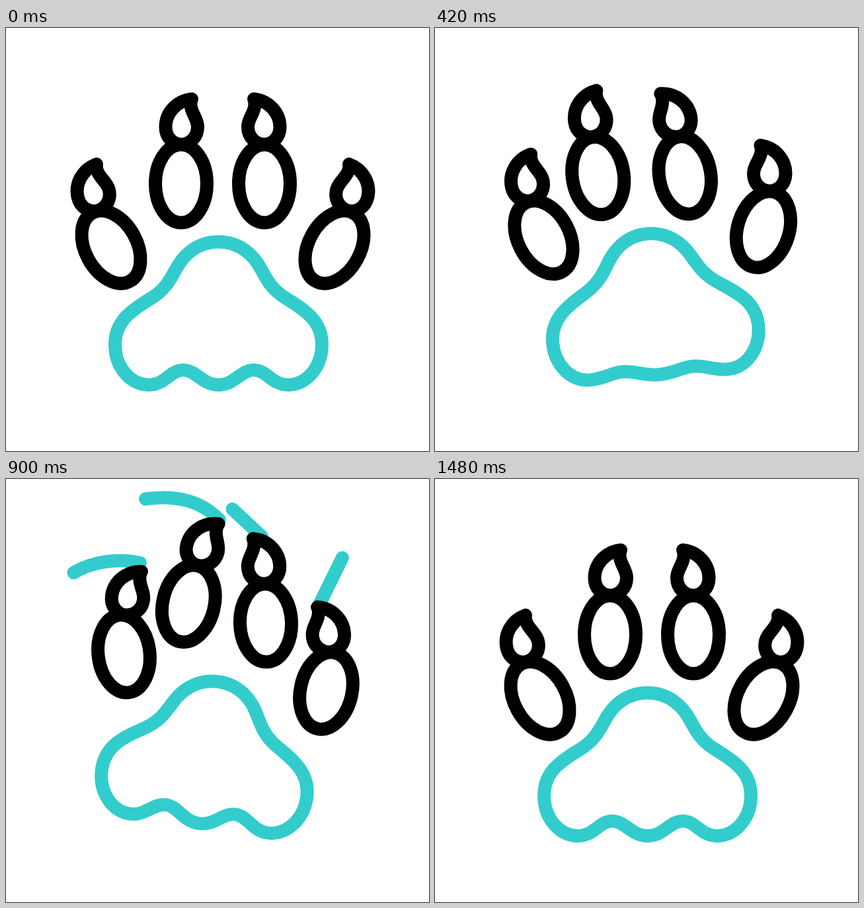
Write an HTML page that moves like this. It is 640 px wide and 640 px high and loops after 1.6 s.

```html
<!DOCTYPE html>
<html lang="en">
<head>
<meta charset="utf-8">
<title>Paw swipe</title>
<style>
html, body { margin: 0; height: 100%; overflow: hidden; background: #fff; }
svg { display: block; width: 100%; height: 100%; }
svg * { fill: none; stroke-width: 20; stroke-linecap: round; stroke-linejoin: round; }
.toe { stroke: #000; }
.teal { stroke: #33cccc; }
</style>
</head>
<body>
<svg id="stage" viewBox="0 0 640 640"></svg>
<script>
const LOOP = 1600;
const TIMES = [0, 160, 280, 420, 580, 600, 900, 1060, 1480];
const stage = document.getElementById('stage');

function add(parent, tag, attrs) {
  const el = document.createElementNS('http://www.w3.org/2000/svg', tag);
  for (const k in attrs) el.setAttribute(k, attrs[k]);
  return parent.appendChild(el);
}

function smooth(t, a, b) {
  const x = Math.min(1, Math.max(0, (t - a) / (b - a)));
  return x * x * (3 - 2 * x);
}

// Six poses: rest, wind-up, rise, reach, swipe, recoil.
// The turning points at 280 and 580 ms follow from their neighbours.
function track([rest, wind, rise, reach, swipe, recoil]) {
  const low = rest + (wind - rest) / 0.606;
  const peak = reach + (reach - swipe) * 0.02;
  return curve([rest, wind, low, rise, peak, reach, swipe, recoil, rest]);
}

// Monotone cubic through the keys, level at every turning point
function curve(v) {
  const n = v.length;
  const h = i => TIMES[i + 1] - TIMES[i];
  const d = i => (v[i + 1] - v[i]) / h(i);
  const m = v.map((_, i) => {
    if (i === 0 || i === n - 1 || d(i - 1) * d(i) <= 0) return 0;
    const w1 = 2 * h(i) + h(i - 1), w2 = h(i) + 2 * h(i - 1);
    return (w1 + w2) / (w1 / d(i - 1) + w2 / d(i));
  });
  return t => {
    if (t >= TIMES[n - 1]) return v[n - 1];
    let i = 0;
    while (t >= TIMES[i + 1]) i++;
    const u = (t - TIMES[i]) / h(i), s = u * u * (3 - 2 * u);
    return v[i] + (v[i + 1] - v[i]) * s
      + h(i) * u * (1 - u) * (m[i] * (1 - u) - m[i + 1] * u);
  };
}

// Pad: position, tilt, stretch of the top arc, height of the lower waves
const pad = {
  x: track([321.5, 308, 333.5, 362.5, 300, 306]),
  y: track([479, 501.5, 464, 405, 460.5, 477.5]),
  r: track([0, 4.7, -4.4, -16.2, 7.9, 5.8]),
  stretch: track([0, -0.18, -0.1, 1, 0, 0]),
  wave: track([22.5, 15.5, 8.6, 8, 21, 21.5])
};

const toes = [
  { side: 1, outer: true,
    x: track([159, 170.5, 164.5, 149.5, 178.5, 171.5]),
    y: track([331.5, 343, 317, 286, 264.5, 298]),
    r: track([0, 17, 1.5, -32, 22, 16.5]) },
  { side: 1,
    x: track([265, 276.5, 247, 199, 276.3, 273.7]),
    y: track([235.5, 267, 224, 166, 188.5, 217]),
    r: track([0, 8.5, -8, -34.5, 13.5, 10.6]) },
  { side: -1,
    x: track([391, 390, 378.3, 360.7, 393, 391.5]),
    y: track([235.5, 278.7, 223.5, 136.5, 217.7, 235.7]),
    r: track([0, -1.3, -9.5, -13.5, -1.5, -1.5]) },
  { side: -1, outer: true,
    x: track([497, 483, 496.8, 516.5, 484.5, 485.7]),
    y: track([331.5, 373, 305.5, 206.5, 320.3, 335]),
    r: track([0, -8.4, -12, -5.5, -16, -12.5]) }
];

const CLAW = 'M16-128C-7-125.5-23.5-107-23.5-85.5C-23.5-71-13-59.5 0-59.5'
  + 'C14-59.5 25-71 25-86C25-99 14.5-107 14.5-120C14.5-124 15-126 16-128Z';

const trails = [
  'M64 192C72 172 84 152 102 142C130 125 170 119 203 127',
  'M140 53Q170 36 212 30C262 24 296 34 323 62',
  'M315 20L387 87',
  'M529 78L476 186'
].map(d => add(stage, 'path', { class: 'teal', d, pathLength: 1 }));

const padPath = add(stage, 'path', { class: 'teal' });

for (const toe of toes) {
  toe.el = add(stage, 'g', { class: 'toe' });
  add(toe.el, 'ellipse', { rx: 39, ry: 59, transform: `rotate(${toe.outer ? -29 : 0})` });
  add(toe.el, 'path', {
    d: CLAW,
    transform: toe.outer ? 'translate(-26.5 -80) rotate(-14) translate(-.7 85)' : ''
  });
}

// Left half of the outline from the top down to the side of the lobe
const HALF = [
  [0, -155.5], [-32.5, -155.5], [-53.5, -135], [-64.5, -114],
  [-73.5, -97], [-81.5, -83], [-100.5, -71],
  [-131.5, -52], [-156.5, -36], [-156.5, 0], [-156.5, 34]
];
const STRETCHED = [
  [0, -183], [-42, -183], [-72, -152], [-78, -118],
  [-82, -94], [-91, -74], [-107, -66],
  [-140, -51], [-160, -36], [-160, 1], [-160, 37]
];

function padShape(stretch, wave) {
  const top = HALF.map((p, i) => p.map((c, j) => c + (STRETCHED[i][j] - c) * stretch));
  const crest = 61 - wave;
  const left = top.concat([
    [-133.5, 61], [-104.5, 61],
    [-81.5, 61], [-72.5, crest], [-53.5, crest],
    [-33.5, crest], [-24.5, 61], [0, 61]
  ]);
  const right = left.slice(0, -1).reverse().map(([x, y]) => [-x, y]);
  const [start, ...rest] = left.concat(right);
  return `M${start}C${rest.join(' ')}Z`;
}

function draw(t) {
  padPath.setAttribute('d', padShape(pad.stretch(t), pad.wave(t)));
  padPath.setAttribute('transform', `translate(${pad.x(t)} ${pad.y(t)}) rotate(${pad.r(t)})`);

  for (const { el, x, y, r, side } of toes) {
    el.setAttribute('transform',
      `translate(${x(t)} ${y(t)}) rotate(${r(t)}) scale(${side} 1)`);
  }

  const head = smooth(t, 540, 830), tail = smooth(t, 800, 1040);
  for (const el of trails) {
    el.style.display = head > 0 && tail < 1 ? '' : 'none';
    el.setAttribute('stroke-dasharray', `${head - tail} 2`);
    el.setAttribute('stroke-dashoffset', -tail);
  }
}

function frame() {
  draw(performance.now() % LOOP);
  requestAnimationFrame(frame);
}
frame();
</script>
</body>
</html>
```
